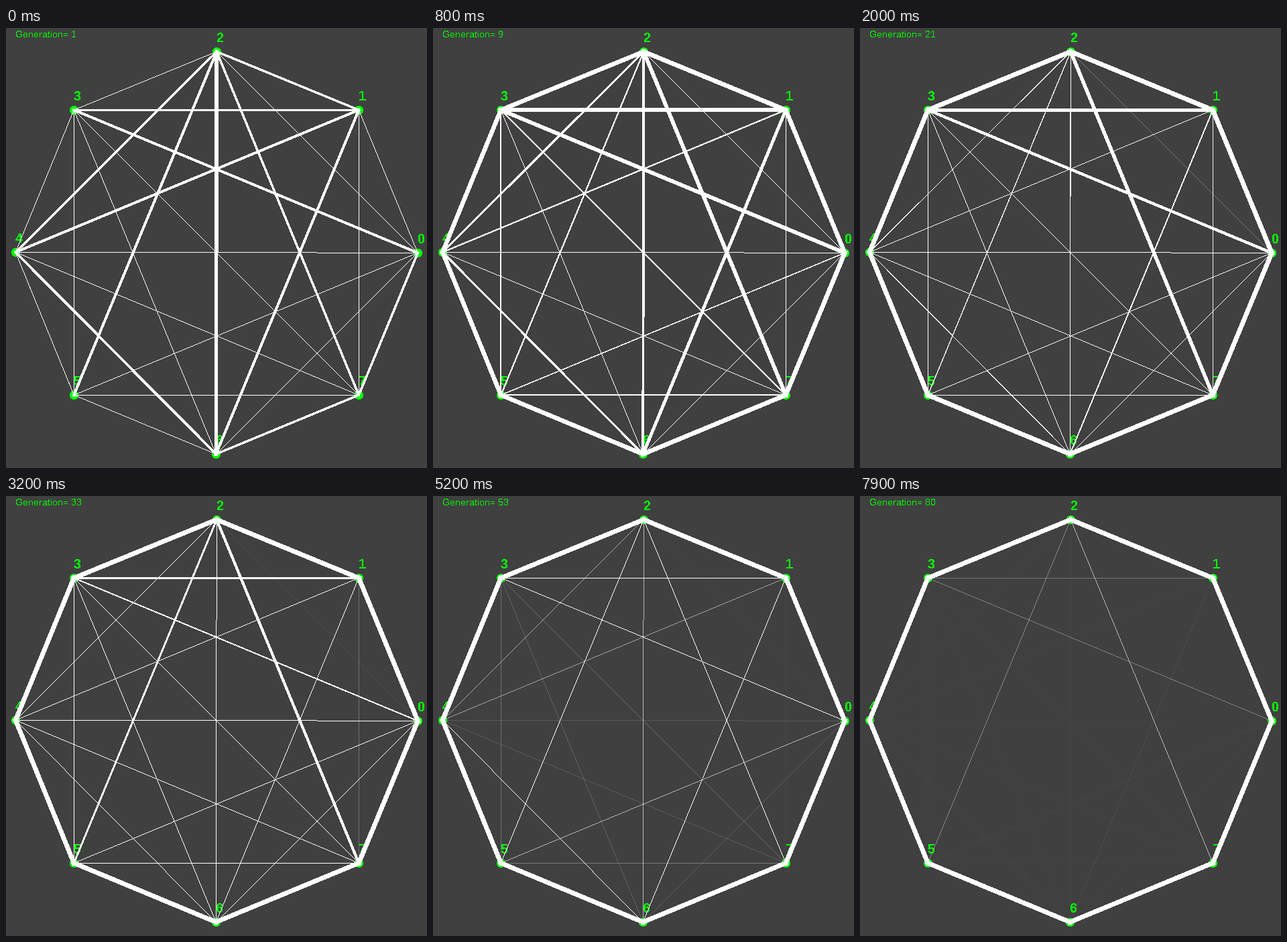
A matplotlib script for the animation above (8 s loop, 628 by 656 pixels).

```python
import matplotlib.pyplot as plt
import numpy as np
from matplotlib.animation import FuncAnimation

W, H, DPI = 628, 656, 100
PT = 72 / DPI
FRAMES = 80
BACK, GREEN = "#404040", "#00ff00"
EVAPORATION = 0.9
FULL = 7.0          # trail width of the converged tour
VISIBILITY = 16     # trails below 1/16 px fade out

plt.rcParams.update({
    "font.family": "Liberation Sans",
    "text.hinting": "native",
    "text.hinting_factor": 1,
    "text.antialiased": False,
})

# Nodes are truncated to whole pixels
angles = np.arange(8) * np.pi / 4
nodes = np.floor(np.column_stack([314 + 300 * np.cos(angles),
                                  335 - 300 * np.sin(angles)]))

# Trail strength of the chords at these generations, evaporating afterwards
KEYS = [1, 6, 18, 29, 42]
CHORDS = {
    "02": (.15, .09, .025, .008, .002),
    "03": (4, 6, 5.5, 2.5, 1.2),
    "04": (.15, .9, .3, .11, .028),
    "05": (.15, 2, .9, .4, .125),
    "06": (.15, 1, .42, .13, .033),
    "13": (3, 6, 6, 4, 1),
    "14": (4, 3, 1, .35, .104),
    "16": (4, 6, 2.6, .8, .21),
    "17": (.15, .28, .08, .025, .006),
    "24": (3.5, 4, 1.4, .5, .11),
    "25": (4, 3, .9, 4, 1.3),
    "26": (5.5, 5, 1.7, .5, .125),
    "27": (3.5, 6, 5.5, 5.5, 2.2),
    "35": (.15, 2, .65, .2, .05),
    "36": (.15, 1, .4, .13, .036),
    "37": (.15, 2, .65, .2, .045),
    "46": (4, 4, 1.5, .6, .2),
    "47": (.15, 1, .35, .11, .03),
    "57": (.15, 2, .65, .2, .06),
}
# Starting strength of the tour around the ring
RING = {"01": .15, "12": 3.5, "23": .8, "34": .8,
        "45": .8, "56": .8, "67": 3.5, "70": 3.5}


def strength(edge, gen):
    if edge in RING:
        return FULL - (FULL - RING[edge]) * 0.71 ** (gen - 1)
    s = np.exp(np.interp(gen, KEYS, np.log(CHORDS[edge])))
    return s * EVAPORATION ** max(0, gen - KEYS[-1])


# Pixel centres, for hard-edged drawing
px, py = np.meshgrid(np.arange(W) + 0.5, np.arange(H) + 0.5)


def stroke_fields(a, b):
    """Half width at which a square-capped stroke covers each pixel,
    and the mask of its one-pixel hairline."""
    d = b - a
    length = np.hypot(*d)
    ux, uy = d / length
    along = (px - a[0]) * ux + (py - a[1]) * uy
    across = (py - a[1]) * ux - (px - a[0]) * uy
    beyond = np.maximum(-along, along - length)
    reach = np.maximum(np.abs(across), beyond).astype(np.float32)
    offset = across * length / np.abs(d).max()
    hairline = (offset > -0.5) & (offset <= 0.5) & (beyond <= 0.5)
    return reach, hairline


trails = {e: stroke_fields(nodes[int(e[0])] + 0.25, nodes[int(e[1])] + 0.25)
          for e in [*CHORDS, *RING]}


def trail_layer(gen):
    cover = np.zeros((H, W), np.float32)
    for edge, (reach, hairline) in trails.items():
        s = strength(edge, gen)
        alpha = min(1, s * VISIBILITY)
        mask = hairline | (reach <= s / 2) if s > 1 else hairline
        cover[mask] += (1 - cover[mask]) * alpha
    return np.rint(cover * 255).astype(np.uint8)


def layer(rgb, alpha, zorder):
    rgba = np.empty((H, W, 4), np.uint8)
    rgba[..., :3] = rgb
    rgba[..., 3] = alpha
    return ax.imshow(rgba, extent=(0, W, H, 0), aspect="auto",
                     interpolation="none", zorder=zorder)


fig = plt.figure(figsize=(W / DPI, H / DPI), dpi=DPI, facecolor=BACK)
ax = fig.add_axes([0, 0, 1, 1])
ax.axis("off")

dots = np.zeros((H, W), bool)
for i, (x, y) in enumerate(nodes):
    dots |= np.hypot(px - x - 0.5, py - y - 0.5) <= 6.5
    ax.text(x, y - 14, str(i), color=GREEN, size=20 * PT, weight="bold",
            va="baseline", zorder=2)
layer((0, 255, 0), dots * 255, 1)
title = ax.text(14, 14, "", color=GREEN, size=14 * PT, va="baseline", zorder=2)
lines = layer((255, 255, 255), 0, 3)
ax.set(xlim=(0, W), ylim=(H, 0))


def update(i):
    gen = i + 1
    title.set_text(f"Generation= {gen}")
    rgba = np.full((H, W, 4), 255, np.uint8)
    rgba[..., 3] = trail_layer(gen)
    lines.set_data(rgba)
    return title, lines


anim = FuncAnimation(fig, update, frames=FRAMES, interval=100,
                     repeat=True, repeat_delay=0)
plt.show()
```
